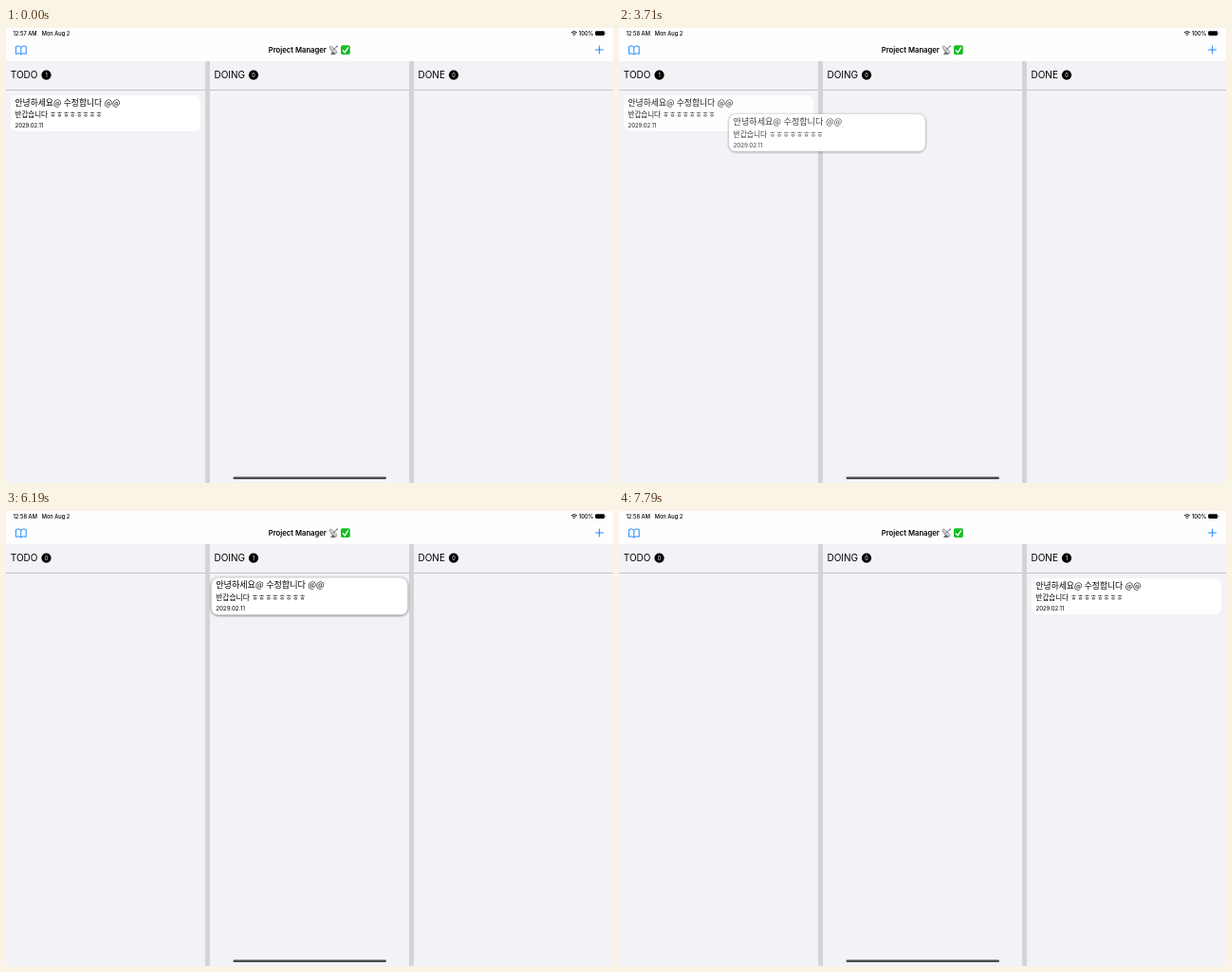
Recreate the animation shown at these times as an HTML page. Size 640 by 480 pixels, loop 8000 ms.

```html
<!DOCTYPE html>
<html lang="ko">
<head>
<meta charset="utf-8">
<title>Project Manager</title>
<style>
  html, body { margin: 0; width: 100%; height: 100%; overflow: hidden; background: #fff; }
  svg { display: block; width: 100vw; height: 100vh; }
  text { font-family: Inter, sans-serif; }
  .ko { font-family: "Noto Sans CJK KR", "Noto Sans CJK", "Noto Sans CJK JP", sans-serif; }
  .status { font-size: 5.7px; font-weight: 500; }
  .heading { font-size: 10px; }
  .count { font-size: 5.5px; fill: #fff; text-anchor: middle; }
  .blue { fill: none; stroke: #087bff; stroke-width: .9; stroke-linejoin: round; }

  /* Every track shares one 8 s clock; 1% = 80 ms */
  .anim { animation: 8s linear infinite both; }
  .minute-old { animation-name: minute-old; }
  .minute-new { animation-name: minute-new; }
  .in-todo { animation-name: in-todo; }
  .not-todo { animation-name: not-todo; }
  .in-doing { animation-name: in-doing; }
  .not-doing { animation-name: not-doing; }
  .in-done { animation-name: in-done; }
  .not-done { animation-name: not-done; }
  .ghost-todo { animation-name: ghost-todo; }
  .ghost-doing { animation-name: ghost-doing; }
  .drag { animation-name: drag; transform-origin: 105px 90px; }
  .shadow { animation-name: shadow; filter: blur(.8px); }
  .ink { animation-name: ink; }
  .plus { animation-name: plus; }

  @keyframes minute-old { 0%, 6.24% { opacity: 1 } 6.25%, 100% { opacity: 0 } }
  @keyframes minute-new { 0%, 6.24% { opacity: 0 } 6.25%, 100% { opacity: 1 } }
  @keyframes in-todo    { 0%, 53.74% { opacity: 1 } 53.75%, 100% { opacity: 0 } }
  @keyframes not-todo   { 0%, 53.74% { opacity: 0 } 53.75%, 100% { opacity: 1 } }
  @keyframes in-doing   { 0%, 53.74% { opacity: 0 } 53.75%, 91.62% { opacity: 1 } 91.63%, 100% { opacity: 0 } }
  @keyframes not-doing  { 0%, 53.74% { opacity: 1 } 53.75%, 91.62% { opacity: 0 } 91.63%, 100% { opacity: 1 } }
  @keyframes in-done    { 0%, 91.62% { opacity: 0 } 91.63%, 100% { opacity: 1 } }
  @keyframes not-done   { 0%, 91.62% { opacity: 1 } 91.63%, 100% { opacity: 0 } }

  @keyframes ghost-todo {
    0%, 43.74% { opacity: 0 }
    43.75%, 45.5% { opacity: 1 }
    49%, 53.74% { opacity: .5 }
    53.75%, 100% { opacity: 0 }
  }
  @keyframes ghost-doing {
    0%, 80.12% { opacity: 0 }
    80.13%, 82.5% { opacity: 1 }
    86.5%, 91.62% { opacity: .5 }
    91.63%, 100% { opacity: 0 }
  }
  @keyframes drag {
    0%, 34% { transform: none }
    40%, 43.75% { transform: translate(0, 0) scale(1.035) }
    46.375% { transform: translate(114px, 20.5px) scale(1.035) }
    49% { transform: translate(195px, 24px) scale(1.035) }
    51.5% { transform: translate(213px, 25px) scale(1.035) }
    53.75% { transform: translate(214px, 25px) scale(1.035); animation-timing-function: ease-out }
    58.75%, 70.375% { transform: translate(215px, 0) scale(1) }
    75%, 80.125% { transform: translate(215px, 0) scale(1.035) }
    81.5% { transform: translate(227px, 3px) scale(1.035) }
    85.375% { transform: translate(333px, 17px) scale(1.035) }
    87.5% { transform: translate(409px, 23.5px) scale(1.035) }
    89% { transform: translate(427px, 24px) scale(1.035) }
    91.625% { transform: translate(429px, 24px) scale(1.035); animation-timing-function: ease-out }
    96.5%, 100% { transform: translate(430px, 0) scale(1) }
  }
  @keyframes shadow {
    0%, 34% { opacity: 0 }
    40%, 43.75% { opacity: .5 }
    46.375%, 53.75% { opacity: .35 }
    58.75%, 70.375% { opacity: 0 }
    75%, 91.625% { opacity: .5 }
    96.5%, 100% { opacity: 0 }
  }
  @keyframes ink {
    0%, 43.75% { opacity: 1 }
    46.375%, 53.75% { opacity: .75 }
    58.75%, 81% { opacity: 1 }
    86%, 91.625% { opacity: .9 }
    96.5%, 100% { opacity: 1 }
  }
  @keyframes plus {
    0%, 48.5% { opacity: 0 }
    49.5%, 53.5% { opacity: 1 }
    54.5%, 86% { opacity: 0 }
    87%, 91.4% { opacity: 1 }
    92.4%, 100% { opacity: 0 }
  }
</style>
</head>
<body>
<svg viewBox="0 0 640 480" preserveAspectRatio="none">
  <defs>
    <rect id="paper" x="5" y="71" width="200" height="38" rx="7"/>
    <g id="words">
      <text class="ko" x="9.5" y="81.6" font-size="8.8">안녕하세요@ 수정합니다 @@</text>
      <text class="ko" x="9.5" y="94" font-size="7.5">반갑습니다 ㅎㅎㅎㅎㅎㅎㅎㅎ</text>
      <text x="9.5" y="104.5" font-size="6">2029.02.11</text>
    </g>
    <g id="card">
      <use href="#paper" fill="#fff"/>
      <use href="#words"/>
    </g>
    <g id="column">
      <rect y="35" width="210" height="445" fill="#f2f2f7"/>
      <rect y="65" width="210" height="1" fill="#c3c3c7"/>
    </g>
  </defs>

  <rect width="640" height="480" fill="#d3d3d8"/>
  <rect width="640" height="35" fill="#fefefe"/>
  <use href="#column"/>
  <use href="#column" x="215"/>
  <use href="#column" x="430"/>

  <!-- Status bar -->
  <g class="status">
    <text class="anim minute-old" x="7.5" y="7.6">12:57 AM</text>
    <text class="anim minute-new" x="7.5" y="7.6">12:58 AM</text>
    <text x="37.7" y="7.6">Mon Aug 2</text>
    <text x="604" y="7.6">100%</text>
  </g>
  <g fill="none" stroke="#000" stroke-width=".9">
    <path d="M596 4.8q3-2.6 6 0M597.2 6.2q1.8-1.5 3.6 0"/>
    <circle cx="599" cy="7.3" r=".3"/>
  </g>
  <rect x="621.2" y="3.3" width="10" height="4.6" rx="1.3" fill="#000"/>
  <rect x="631.8" y="4.8" width=".8" height="1.6" rx=".4" fill="#777"/>

  <!-- Navigation bar -->
  <path class="blue" d="M15.8 20.2Q13.2 17.8 10.4 19.6V27.3Q13.4 26 15.8 27.8Q18.2 26 21.2 27.3V19.6Q18.4 17.8 15.8 20.2V27.8"/>
  <path class="blue" d="M621.2 23h8.8M625.6 18.6v8.8"/>
  <text x="276.7" y="25.8" font-size="7.7" font-weight="600">Project Manager</text>
  <g>
    <path d="M344 25l-2 3h5.5l-1.5-3.5z" fill="#6c6e72"/>
    <path d="M341.3 19.2Q341 26 348.8 26.8Z" fill="#96999e"/>
    <ellipse cx="345" cy="23" rx="5.2" ry="1.7" transform="rotate(45 345 23)" fill="#d0d2d5" stroke="#6c6e72" stroke-width=".5"/>
    <path d="M345 23l4-3.6" stroke="#444" stroke-width=".8"/>
    <circle cx="349.2" cy="19.3" r=".8" fill="#555"/>
  </g>
  <rect x="353" y="18.2" width="9.8" height="9.8" rx="1.7" fill="#16bd27"/>
  <path d="M355 23.4l2.2 2.4 3.6-5.4" fill="none" stroke="#fff" stroke-width="1.4"/>

  <!-- Column headings -->
  <g class="heading">
    <text x="4.8" y="53.3">TODO</text>
    <text x="219.5" y="53.3">DOING</text>
    <text x="434.5" y="53.3">DONE</text>
  </g>
  <circle cx="42.5" cy="49.6" r="5.1"/>
  <circle cx="261" cy="49.6" r="5.1"/>
  <circle cx="472" cy="49.6" r="5.1"/>
  <g class="count">
    <text class="anim in-todo" x="42.5" y="51.6">1</text>
    <text class="anim not-todo" x="42.5" y="51.6">0</text>
    <text class="anim in-doing" x="261" y="51.6">1</text>
    <text class="anim not-doing" x="261" y="51.6">0</text>
    <text class="anim in-done" x="472" y="51.6">1</text>
    <text class="anim not-done" x="472" y="51.6">0</text>
  </g>

  <!-- Dimmed copies left behind, then the travelling card -->
  <use class="anim ghost-todo" href="#card"/>
  <use class="anim ghost-doing" href="#card" x="215"/>
  <g class="anim drag">
    <use class="anim shadow" href="#paper" y=".5" stroke="#000" stroke-width=".8"/>
    <use href="#paper" fill="#fff"/>
    <use class="anim ink" href="#words"/>
    <g class="anim plus">
      <circle cx="204.3" cy="71.6" r="5.8" fill="#34c759"/>
      <path d="M201.3 71.6h6M204.3 68.6v6" stroke="#fff" stroke-width="1.1"/>
    </g>
  </g>

  <rect x="239.5" y="473.6" width="161.5" height="2.4" rx="1.2" fill="#4a4a4c"/>
</svg>
</body>
</html>
```
